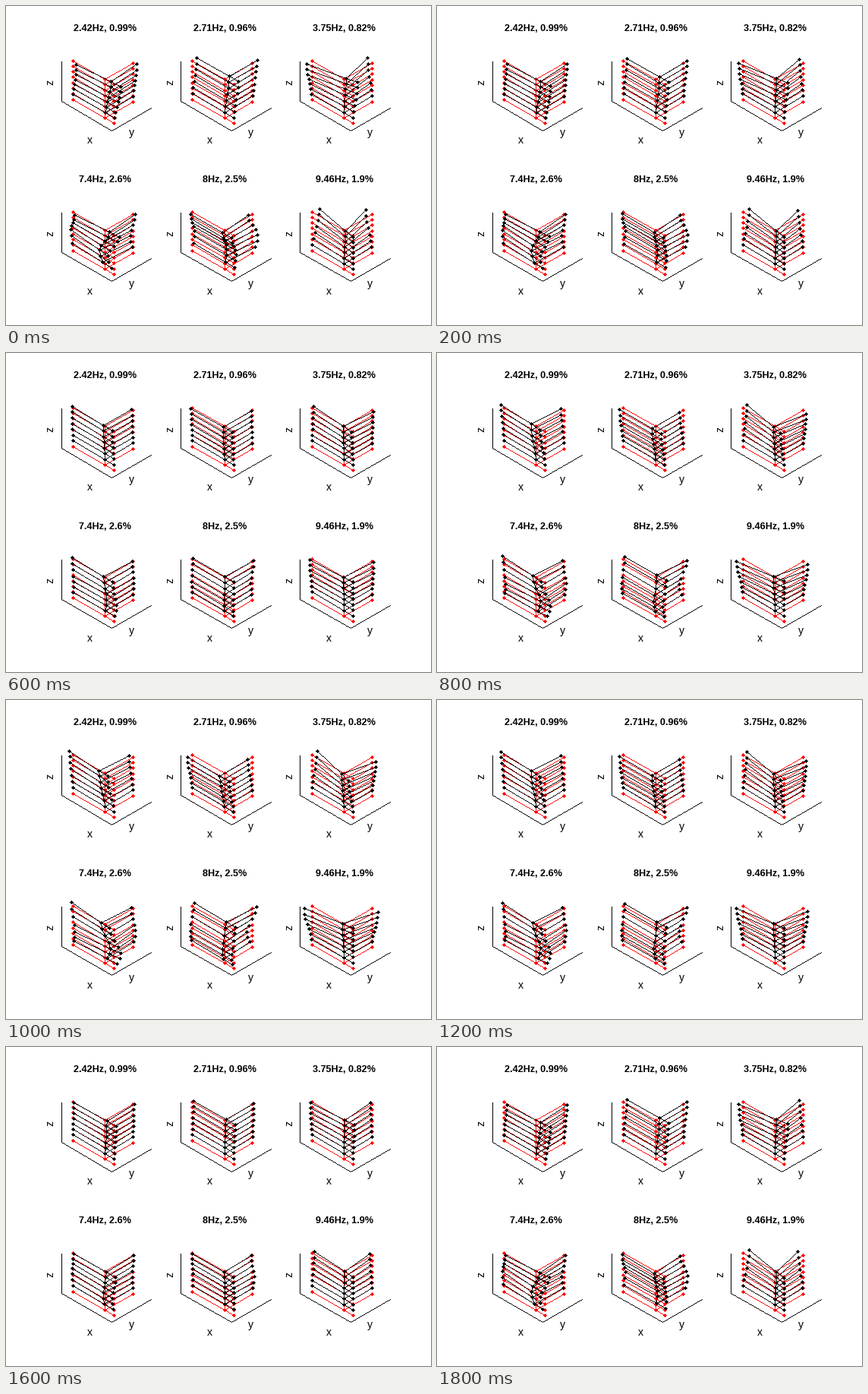
Write a matplotlib script that moves like this. It is 560 by 420 pixels and loops after 2000 ms.

```python
import numpy as np
import matplotlib.pyplot as plt
from matplotlib.animation import FuncAnimation

W, H, DPI = 560, 420, 72
FRAMES, INTERVAL = 10, 200
STEP = np.array([157.4, 199])
RED, BLACK = (255, 0, 0), (0, 0, 0)

# Isometric floor directions and the corner column's foot, in pixels
EX = np.array([np.cos(np.pi / 6), 0.5])
EY = np.array([np.cos(np.pi / 6), -0.5])
FOOT = np.array([130.2, 147])
AXIS_FOOT = np.array([72.6, 125])
AXIS_X, AXIS_Y, AXIS_Z = 77, 60, 52

# L-shaped floor plan: left end, corner, front end, right end
PLAN_X = np.array([-48.8, 0, 14, 0])
PLAN_Y = np.array([0, 0, 0, 42.5])
WINGS = [(0, 1), (1, 2), (1, 3)]
CORNER = 1
LEVELS, TOP = 8, 51

height = np.linspace(0, 1, LEVELS)
first_bend = np.sin(np.pi * height / 2) ** 2
second_bend = -np.sin(1.5 * np.pi * height ** 1.25) * (1.45 - 0.45 * height)

# Title, bending shape, then roof motion: x shift, y shift, twist, shear
MODES = [
    ("2.42Hz, 0.99%", first_bend, 7.6, 1.3, 0.075, 0),
    ("2.71Hz, 0.96%", first_bend, 0, 7.1, 0, 0),
    ("3.75Hz, 0.82%", first_bend, 0.3, 3.1, 0.23, 0),
    ("7.4Hz, 2.6%", second_bend, 5.5, 1, 0.085, 0),
    ("8Hz, 2.5%", second_bend, 2, -4.6, 0.045, 0.045),
    ("9.46Hz, 1.9%", first_bend, 2, 0.7, 0.047, 0.233),
]


def project(x, y):
    return np.multiply.outer(x, EX) + np.multiply.outer(y, EY)


def roof_motion(dx, dy, twist, shear):
    """Screen displacement of each column's top at full swing."""
    return project(dx - (twist + shear) * PLAN_Y,
                   dy + (twist - shear) * PLAN_X)


def stroke(canvas, start, end, color):
    """Crisp one-pixel line."""
    start, end = np.rint(start), np.rint(end)
    count = int(np.abs(end - start).max()) + 1
    x, y = np.rint(np.linspace(start, end, count)).astype(int).T
    canvas[y, x] = color


def dot(canvas, center, color, radius=2):
    x, y = np.rint(center).astype(int)
    for dy in range(-radius, radius + 1):
        reach = radius - abs(dy)
        canvas[y + dy, x - reach:x + reach + 1] = color


def draw_frame(canvas, joints, color):
    for level in joints:
        for a, b in WINGS:
            stroke(canvas, level[a], level[b], color)
    for lower, upper in zip(joints, joints[1:]):
        stroke(canvas, lower[CORNER], upper[CORNER], color)
    for joint in joints.reshape(-1, 2):
        dot(canvas, joint, color)


def draw_axes(canvas, origin):
    foot = AXIS_FOOT + origin
    front = foot + AXIS_X * EX
    stroke(canvas, foot - (0, AXIS_Z), foot, BLACK)
    stroke(canvas, foot, front, BLACK)
    stroke(canvas, front, front + AXIS_Y * EY, BLACK)


fig = plt.figure(figsize=(W / DPI, H / DPI), dpi=DPI, facecolor="white")
ax = fig.add_axes([0, 0, 1, 1])
ax.axis("off")


def label(origin, x, y, text, size=14, va="baseline", **style):
    ax.text(origin[0] + x, origin[1] + y, text, size=size, va=va,
            ha="center", family="Liberation Sans", **style)


background = np.full((H, W, 3), 255, np.uint8)
towers = []
for i, (title, bend, *motion) in enumerate(MODES):
    origin = STEP * (i % 3, i // 3)
    draw_axes(background, origin)
    label(origin, 130.5, 32.5, title, size=12.6, weight="bold")
    label(origin, 110, 181, "x")
    label(origin, 164.5, 170.5, "y")
    label(origin, 58, 99.5, "z", va="center", rotation=90)

    floor = FOOT + origin + project(PLAN_X, PLAN_Y)
    rest = floor - np.multiply.outer(height, [[0, TOP]])
    draw_frame(background, rest, RED)
    # The ground level stays still, so only the storeys above it swing.
    towers.append((rest[1:], bend[1:, None, None] * roof_motion(*motion)))

image = ax.imshow(background, extent=(-0.5, W - 0.5, H - 0.5, -0.5),
                  interpolation="nearest", aspect="auto")


def update(frame):
    swing = np.cos(2 * np.pi * frame / FRAMES)
    canvas = background.copy()
    for rest, shift in towers:
        draw_frame(canvas, rest + swing * shift, BLACK)
    image.set_data(canvas)
    return [image]


anim = FuncAnimation(fig, update, frames=FRAMES, interval=INTERVAL,
                     repeat=True, repeat_delay=0, blit=False)
plt.show()
```
